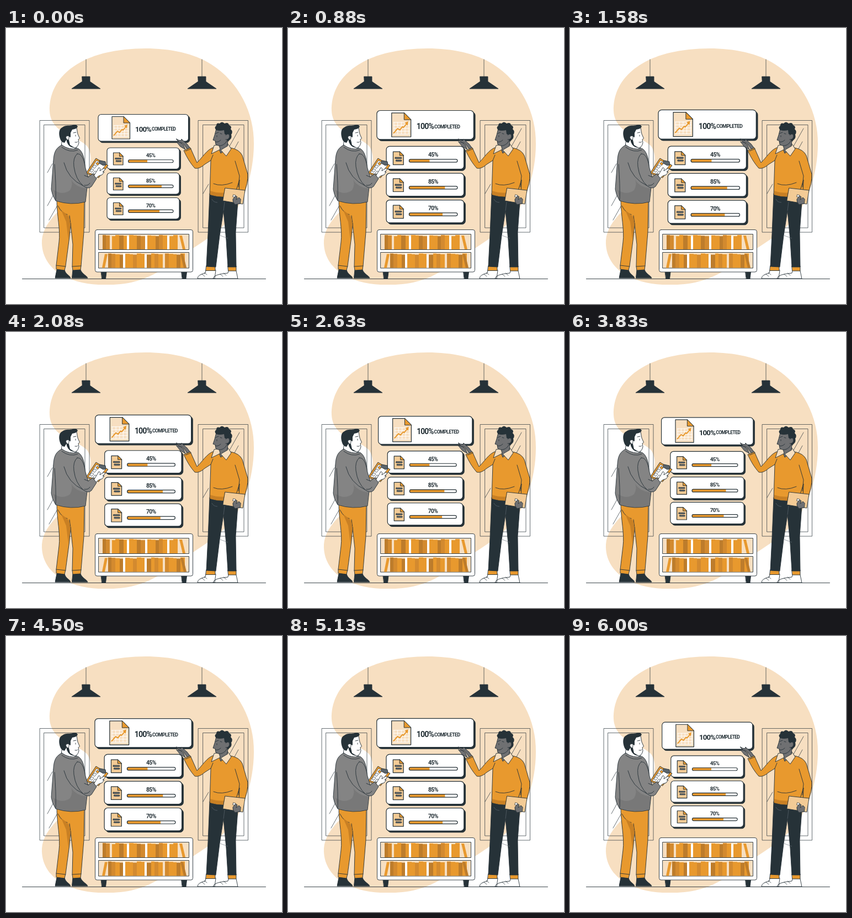
These frames come from a looping animation (500 by 500 pixels, 6040 ms). An HTML page:

```html
<!DOCTYPE html>
<html lang="en">
<head>
<meta charset="utf-8">
<title>Progress board</title>
<style>
  html, body { margin: 0; width: 100%; height: 100%; overflow: hidden; background: #fff; }
  svg { display: block; width: 100vw; height: 100vh; }
  .o { fill: #e8992e; } .p { fill: #f7dfc1; } .t { fill: #f3cb96; } .g { fill: #848484; }
  .b { fill: #c98024; } .s { fill: #6f7072; } .d { fill: #263238; } .w { fill: #fff; } .n { fill: none; }
  .l { stroke: #263238; stroke-width: .9; stroke-linejoin: round; stroke-linecap: round; }
  .thin { stroke-width: .7; }
  .bold { stroke-width: 1.15; }
  text { font-family: Roboto, "Open Sans", "Liberation Sans", sans-serif; font-weight: 700;
         letter-spacing: -.065em; fill: #263238; }
</style>
</head>
<body>
<svg viewBox="0 0 500 500" xmlns="http://www.w3.org/2000/svg">
  <path class="p" d="M79 150C78 92 126 58 180 45C242 31 322 34 372 66C422 98 450 154 449 210C449 262 431 320 400 352C372 382 330 402 290 432C258 456 222 465 188 465C152 466 128 461 104 449C76 434 64 410 65 385C68 345 112 322 133 290C151 263 161 235 147 214C128 194 81 192 79 150Z"/>

  <g class="n l thin">
    <path d="M61.500 167.500H151V370H61.500ZM69 175.500H143V362H69ZM348.500 167.500H438.500V370H348.500ZM357 175.500H431V362H357Z"/>
    <path d="M75 262L84 246M86 242L90 235M75 322L95 286M78 348L99 311M101 307L105 300M423 182L405 214M402 219L396 230M421 206L410 226M357 300L367 283"/>
  </g>

  <g id="lamps"></g>
  <path class="l" d="M29.500 454.500H470.500"/>

  <g id="shelf">
    <path class="d l" d="M172.500 442H182L180.500 454.500H174ZM318 442H327.500L326 454.500H319.500Z"/>
    <rect class="w l" x="161.500" y="365.500" width="177" height="76.500" rx="3.500"/>
    <path class="p l" d="M168 373.500H331.500V401.500H168ZM168 406.500H331.500V435H168Z"/>
    <g id="books"></g>
  </g>

  <g id="cards"></g>

  <g id="reader">
    <path class="d l" d="M92 438L89 453H117C116 448 108 447 106 438ZM121 438L119.500 453H148C146 448 138 446 135 438Z"/>
    <path class="o l" d="M92 312C92 338 99 366 96 388L91 430L91 437L106 439L108 431L115 378L117 354L121 392L120 432L121 439L135 438L136 431L141 370L142 314Z"/>
    <path class="n l" d="M91 430L108 432M120 432L136 431M117 354L115 340M94 322Q101 336 111 338"/>
    <path class="b" d="M100 330Q111 338 115 343L117 357L113 383L109 351Z"/>
    <path class="w l" d="M102 201L100 214Q114 227 128 217L126 208Z"/>
    <path class="w l" d="M107 185Q118 178 128 181L130 192L133.500 200L131 202L132 208Q130 217 124 217Q115 214 111 206Z"/>
    <path class="d" d="M99 203C95 194 95 183 102 180C108 175 116 178 122 175.500Q128 174 130 178.500Q128 183 120 184L117 190V198L112 196L109 203L106 208Q101 207 99 203Z"/>
    <path class="d" d="M110 202L114 203L116 212L124 217Q114 217 110 206Z"/>
    <path class="w l" d="M113 203C106 201 108 193 114 196Z"/>
    <path class="n l" d="M122 190L127 189M126 194V196M125 207Q129 208 130 206"/>
    <path class="g l" d="M101 212C91 217 87 224 86 239L82 292Q83 302 90 313Q118 322 144 315L147 289L143 251C142 233 138 222 130 218Q115 222 101 212Z"/>
    <path fill="#686868" opacity=".45" d="M86 293Q102 304 116 294Q122 283 118 275Q126 288 146 291L144 314Q118 321 91 312Z"/>
    <path class="n l" d="M88 247Q91 283 90 312M105 244Q112 273 140 286M101 216Q116 227 130 221"/>
    <path class="o l" d="M145 263L163 236L185 249L168 271Z"/>
    <path class="w l thin" d="M149 262L164 240L180 249L166 267Z"/>
    <path class="n l thin" d="M152 259L155 255L159 257L156 261ZM157 252L160 248L164 250L161 254ZM158 263L161 259L165 261L162 265Z"/>
    <path class="o l thin" d="M163 245L166 243L169 246L166 249Z"/>
    <path fill="#59636a" class="l" d="M170 240L180 242L181 248L176 249L169 245Z"/>
    <path class="w l" d="M157 272L162 263Q166 257 168 253Q172 253 170 259L177 254L180 256L175 261L178 261L174 266L168 268L162 273Z"/>
    <path class="g l" d="M129 228C139 227 142 243 144 254L149 270L157 264L164 273L155 287Q149 293 140 286Q126 274 123 251Q121 235 129 228Z"/>
    <path class="n l" d="M142 267L149 270M142 285Q149 286 152 281"/>
  </g>

  <g id="presenter">
    <path class="w l" d="M362 439L361 444Q347 447 347 454H378L380 439ZM403 440L402 444Q376 446 375 454H420L417 440Z"/>
    <path class="n l thin" d="M355 446L360 450M359 443L364 447M388 446L393 450M394 444L399 448"/>
    <path class="o l" d="M363 431H379V439.500H362ZM402 431H417V440H403Z"/>
    <path class="d l" d="M369 300L366 373L363 432L380 433L387 376L394 331L399 384L402 433L417 433L416 370L421 301Z"/>
    <path fill="none" stroke="#657078" stroke-width=".6" d="M394 331L396 315M388 376L402 381M373 310Q376 316 383 316"/>
    <path class="s l" d="M329 221L321 209L314 207L309 202Q307 199 312 203L317 204L318 201L322 205L328 210L334 218Z"/>
    <path class="s l" d="M309 206L315 207L321 211L325 220L316 215Z"/>
    <path class="o l" d="M374 217C364 221 356 234 346 244L334 217L322 222Q331 242 342 254Q350 256 360 247L371 240L369 302Q393 310 422 302L423 275L416 297L430 303Q439 279 438 265L428 231Q423 220 407 217Z"/>
    <path class="b" d="M370 295Q393 303 420 293L421 302Q393 309 370 302Z"/>
    <path class="n l" d="M325 223L335 219M371 240L375 230M415 241L423 268L421 288M376 282Q390 288 410 280"/>
    <path class="s l" d="M386 208L386 219L389 227L400 219L402 205Z"/>
    <path class="p l" d="M377 213L372 228L388 220L386 212ZM402 210L408 219L399 232L389 221L401 214Z"/>
    <path class="s l" d="M381 182L378 194L375 203L379 204L380 211Q389 217 398 208L405 195L401 181Z"/>
    <path class="d" d="M381 185Q376 180 381 177Q381 171 387 173Q391 168 396 173Q403 170 404 176Q410 178 407 183Q412 188 408 193Q410 199 405 203L402 206L399 201L400 194L396 192L395 185Q387 187 381 185Z"/>
    <path class="s l" d="M398 194Q404 189 405 196Q404 203 398 202"/>
    <path class="n l" d="M380 191L385 189M382 195V197M379 206Q384 208 389 203M388 191L391 192"/>
    <path class="t l" d="M397 290L433 294L429 319L393 313Z"/>
    <path class="s l" d="M424 318L415 320Q410 315 411 310L416 304L419 306L417 311L422 307L425 310Z"/>
    <path class="w l thin" d="M412 302L416 303L415 306L411 306Z"/>
  </g>
</svg>

<script>
const byId = id => document.getElementById(id);

const lamp = x => `<path class="l thin" d="M${x} 57V90"/>
  <path class="d l" d="M${x - 7} 88H${x + 7}V97L${x + 26} 110H${x - 26}L${x - 7} 97Z"/>`;
byId('lamps').innerHTML = lamp(145) + lamp(355);

// Each letter is one book: brown, mid, orange, or a slim white or peach one.
const tones = { o: '#e8992e', m: '#d38a2f', b: '#bd7c2b', p: '#f7dfc1', w: '#fff' };
function bookRow(row, x, base, height) {
  return [...row].map((tone, i) => {
    const width = tone === 'w' || tone === 'p' ? 4 : 6 + i % 3;
    const tall = height - (i * 5 % 4) * .7;
    const book = `<rect x="${x}" y="${base - tall}" width="${width}" height="${tall}" fill="${tones[tone]}"/>`;
    x += width;
    return book;
  }).join('');
}
const leaning = (x, base, shift, tone) =>
  `<path fill="${tones[tone]}" d="M${x} ${base}h5l${shift} -25h-5z"/>`;
byId('books').innerHTML =
  bookRow('bmpoobowoobmwoobmowoop', 175, 401, 26) + leaning(320, 401, -6, 'o') +
  leaning(174, 434.5, 5, 'o') + bookRow('bmobwoomoowbomopmoobo', 185, 434.5, 26) + leaning(322, 434.5, -6, 'b');

const panel = (x, y, w, h) => `<rect class="d l" x="${x + 2.5}" y="${y + 2.5}" width="${w}" height="${h}" rx="5.5"/>
  <rect class="w l bold" x="${x}" y="${y}" width="${w}" height="${h}" rx="5.5"/>`;

const page = (tone, x, y, w, h, fold) => `<path class="${tone} l bold" d="M${x} ${y}h${w - fold}l${fold} ${fold}v${h - fold}h${-w}z"/>
  <path class="o l" d="M${x + w - fold} ${y}v${fold}h${fold}z"/>`;

function taskCard(percent, filled, y) {
  const bar = `x="221.5" y="${y + 21.8}" width="81.5" height="5" rx="2.5"`;
  return panel(183, y, 131, 38.5) + page('t', 194.5, y + 9, 17.5, 22, 6.5) + `
    <rect class="l thin" x="197.5" y="${y + 18.5}" width="11.5" height="2.2" rx="1.1" fill="#59636a"/>
    <rect class="l thin" x="199" y="${y + 23}" width="10" height="2.2" rx="1.1" fill="#59636a"/>
    <text x="262" y="${y + 17.3}" font-size="9.8" text-anchor="middle">${percent}%</text>
    <rect class="w" ${bar}/>
    <path class="o" d="M224 ${y + 21.8}H${221.5 + filled}v5H224a2.500 2.500 0 0 1 0 -5"/>
    <rect class="n l bold" ${bar}/>`;
}

function summaryCard() {
  const grid = [0, 1, 2, 3, 4].map(i => `M${196 + i * 6.2} 176V197M195 ${176.5 + i * 5}H222`).join('');
  return panel(167, 156.5, 163.5, 48.7) + page('p', 192, 160.5, 32.5, 40.5, 11.5) + `
    <path d="${grid}" class="n" stroke="#fff" stroke-width=".9"/>
    <path d="M195 195L202 187L206 189L210 184L212 185L218 178" class="n" stroke="#e8992e" stroke-width="1.9"/>
    <path class="o" d="M214 177L220 175L219 182Z"/>
    <text x="234" y="188" font-size="13.2">100%</text>
    <text x="264" y="186.5" font-size="8.3">COMPLETED</text>`;
}

const cards = byId('cards');
cards.innerHTML = summaryCard() + taskCard(45, 34.5, 217) + taskCard(85, 60.5, 262.5) + taskCard(70, 56.5, 307.5);

// The cards swell and shrink linearly between these moments of the loop.
const LOOP = 6040;
const GROWTH = .1;
const keys = [[0, 0], [.2, 1], [.6, 0], [.8, 1], [1, 0]];

function growthAt(phase) {
  const next = keys.findIndex(([at]) => at > phase);
  const [t0, v0] = keys[next - 1];
  const [t1, v1] = keys[next];
  return v0 + (v1 - v0) * (phase - t0) / (t1 - t0);
}

function draw(now) {
  const scale = 1 + GROWTH * growthAt(now % LOOP / LOOP);
  cards.setAttribute('transform', `translate(250 252.4) scale(${scale}) translate(-250 -252.4)`);
}

function tick() {
  draw(performance.now());
  requestAnimationFrame(tick);
}
tick();
</script>
</body>
</html>
```
